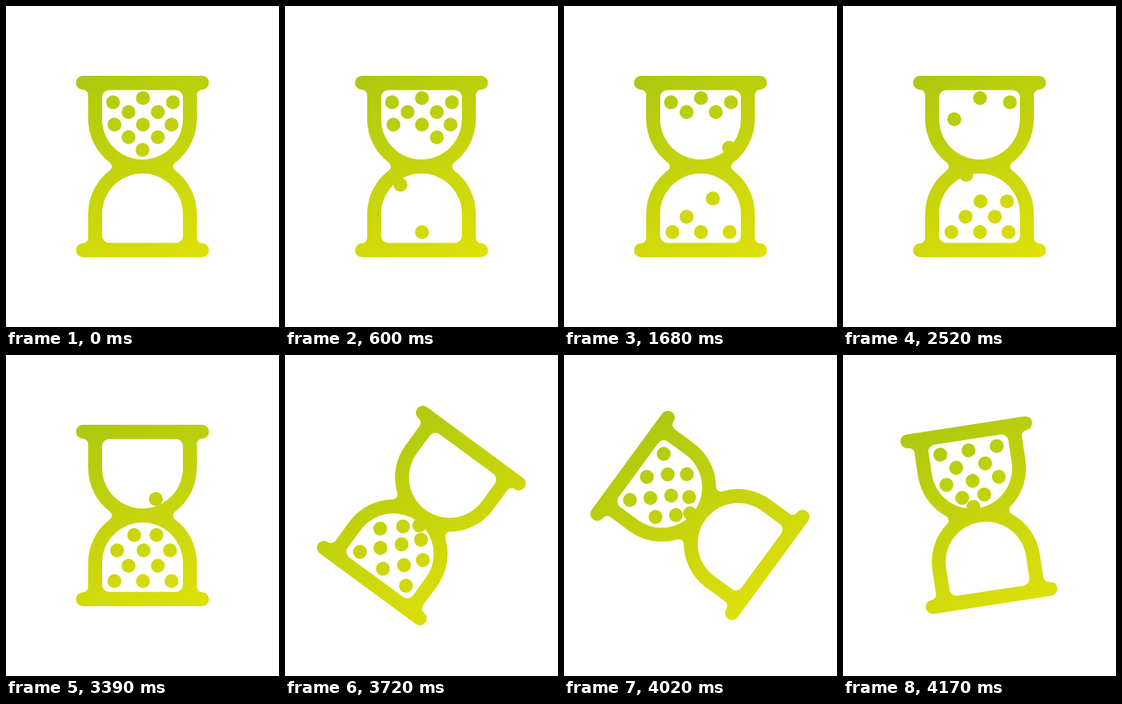
Animation, 392 px wide and 460 px high, one loop 4.2 s. Source, as an HTML page:

```html
<!DOCTYPE html>
<html lang="en">
<head>
<meta charset="utf-8">
<title>Hourglass</title>
<style>
  html, body { margin: 0; width: 100%; height: 100%; overflow: hidden; background: #fff; }
  svg { display: block; width: 392px; height: 460px; }
</style>
</head>
<body>
<svg viewBox="0 0 392 460" aria-label="Hourglass">
  <defs>
    <linearGradient id="lime" gradientUnits="userSpaceOnUse" x1="125" y1="92" x2="277" y2="372">
      <stop offset="0" stop-color="#aec80f"/>
      <stop offset="1" stop-color="#dfe109"/>
    </linearGradient>
    <!-- Upper half of the outline, with its hole. -->
    <path id="half" fill-rule="evenodd" d="
      M110.5 100H281.5a10 10 0 0 1 0 20a7.5 8 0 0 0 -7.5 8V162
      A78 78 0 0 1 242.8 224.4A7 7 0 0 0 240 230V231H152V230
      A7 7 0 0 0 149.2 224.4A78 78 0 0 1 118 162V128a7.5 8 0 0 0 -7.5 -8a10 10 0 0 1 0 -20Z
      M148 120.5H244a10 10 0 0 1 10 10V162a58 58 0 0 1 -116 0V130.5a10 10 0 0 1 10 -10Z"/>
    <clipPath id="stage"><rect width="392" height="460"/></clipPath>
  </defs>
  <g id="glass" fill="url(#lime)"></g>
</svg>
<script>
const LOOP = 4200, STEP = 300, FALL = 600, FLIP_START = 3600;
const PIVOT = "195.6 229.7";
const SVG = "http://www.w3.org/2000/svg";

const glass = document.getElementById("glass");
const gradient = document.getElementById("lime");

function add(tag, attributes) {
  const node = document.createElementNS(SVG, tag);
  for (const name in attributes) node.setAttribute(name, attributes[name]);
  glass.append(node);
  return node;
}

// The lower half mirrors the upper one in the outline's own coordinates.
const half = document.getElementById("half").getAttribute("d");
const mirror = half.replace(/([A-Za-z])([^A-Za-z]*)/g, (_, cmd, text) => {
  const n = text.trim().split(/\s+/).filter(Boolean).map(Number);
  const flip = y => cmd === cmd.toLowerCase() ? -y : 460 - y;
  if (/v/i.test(cmd)) n[0] = flip(n[0]);
  if (/[ml]/i.test(cmd)) n[1] = flip(n[1]);
  if (/a/i.test(cmd)) { n[4] = 1 - n[4]; n[6] = flip(n[6]); }
  return cmd + n.join(" ");
});
for (const d of [half, mirror]) add("path", { d, "fill-rule": "evenodd" });

// A row of grains around a middle; sag lowers its outer grains.
const row = (count, middle, y, gap = 0, sag = 0) =>
  Array.from({ length: count }, (_, i) => {
    const k = i - (count - 1) / 2;
    return { x: middle + k * gap, y: y + Math.abs(k) * sag };
  });

const starts = [
  row(1, 196, 206), row(2, 197, 188, 42), row(3, 196.7, 170, 41),
  row(2, 197, 152, 42), row(3, 196.7, 132, 43, 6)
].flat();

const [left, middle, right] = row(3, 196.7, 324, 41);
const ends = [
  middle, left, right, row(2, 197, 302, 42), row(3, 197.5, 280, -38),
  row(2, 200, 258, 32), row(1, 202, 243)
].flat();

const dots = starts.map(() => add("circle", { r: 10 }));

const clamp = v => Math.min(1, Math.max(0, v));
const mix = (a, b, p) => a + (b - a) * p;

function draw(time) {
  const t = time % LOOP;
  dots.forEach((dot, i) => {
    const p = clamp((t - i * STEP) / FALL);
    dot.setAttribute("cx", mix(starts[i].x, ends[i].x, p));
    dot.setAttribute("cy", mix(starts[i].y, ends[i].y, p));
  });
  const angle = 180 * clamp((t - FLIP_START) / (LOOP - FLIP_START));
  glass.setAttribute("transform", `rotate(${angle} ${PIVOT})`);
  // Counter-rotate so the shading stays fixed on the stage.
  gradient.setAttribute("gradientTransform", `rotate(${-angle} ${PIVOT})`);
}

const start = performance.now();
function tick() {
  draw(performance.now() - start);
  requestAnimationFrame(tick);
}
tick();
</script>
</body>
</html>
```
